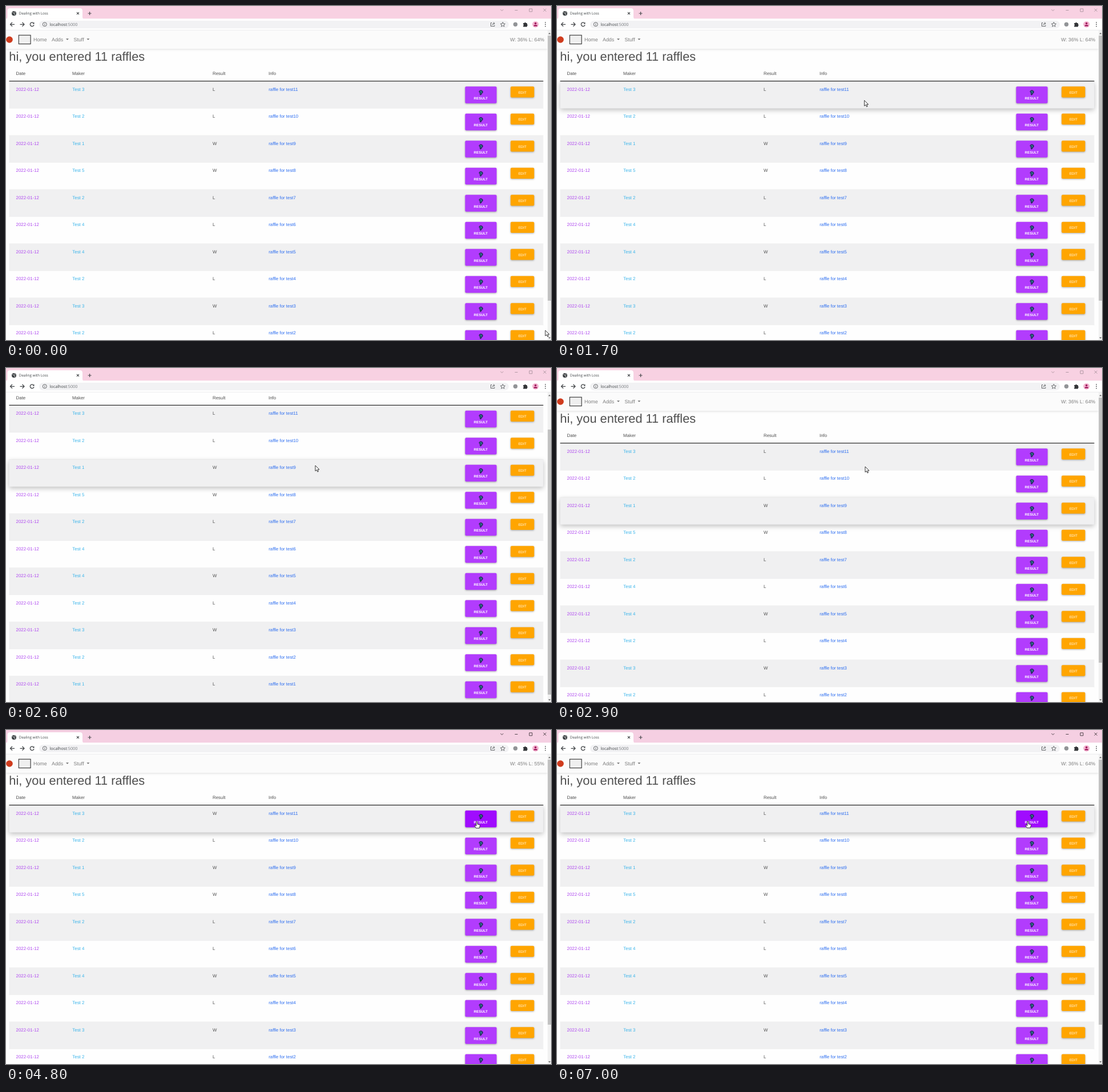
Recreate the animation shown at these times as an HTML page. Size 955 by 586 pixels, loop 7100 ms.

```html
<!DOCTYPE html>
<html lang="en">
<head>
<meta charset="utf-8">
<title>Raffles</title>
<style>
  html, body { margin: 0; width: 100%; height: 100%; overflow: hidden; background: #fff; }
  svg { display: block; width: 955px; height: 586px; }
  text { font-family: "Liberation Sans", Arial, sans-serif; font-size: 7.9px; fill: #4f4f4f;
         text-rendering: geometricPrecision; white-space: pre; }
  .ui { font-family: "Open Sans", sans-serif; fill: #3c4043; }
  .nav { font-size: 8.9px; fill: #7f7f7f; }
  .date { fill: #b04af0; }
  .maker { fill: #39b4ea; }
  .info { fill: #2a6cf0; }
  .btn { filter: drop-shadow(0 1px 1.4px rgba(0,0,0,.32)); }
  .label { fill: #fff; text-anchor: middle; font-size: 6.2px; font-weight: bold; }
  .line { fill: none; stroke: #45474a; stroke-width: 1.1; }
  #hover { filter: drop-shadow(0 3px 4px rgba(0,0,0,.24)); }
  #bar { filter: drop-shadow(0 1px 2px rgba(0,0,0,.13)); }
</style>
</head>
<body>
<svg viewBox="0 0 955 586">
  <defs>
    <clipPath id="view"><rect y="42" width="949" height="544"/></clipPath>
    <g id="ear">
      <path d="M-3 -1.2C-3 -5 3.4 -5 3.4 -1C3.4 1.3 1 1.4 .8 3C.6 4.6 -1.6 4.4 -1.5 2.6" fill="#26346b" stroke="#1c2440" stroke-width="1"/>
      <path d="M-1.4 -1C-1 -3 2 -2.6 1.6 -.6L-.4 1" fill="none" stroke="#35b5b0" stroke-width="1"/>
    </g>
  </defs>
  <rect width="955" height="586" fill="#fefefe"/>

  <g clip-path="url(#view)">
    <g id="page">
      <rect id="bar" y="30" width="949" height="45" fill="#fbfbfb"/>
      <circle cx="6" cy="59" r="5.8" fill="#cf3b1d"/>
      <rect x="22.3" y="51.2" width="20.8" height="15.4" fill="#efefef" stroke="#303030" stroke-width="1.1"/>
      <text class="nav" x="48" y="61.7">Home</text>
      <text class="nav" x="80" y="61.7">Adds</text>
      <text class="nav" x="118.5" y="61.7">Stuff</text>
      <path d="M105 57.2h5l-2.5 2.6zM141.400 57.2h5l-2.5 2.6z" fill="#6f6f6f"/>
      <text class="nav" id="rate" x="943.3" y="61.7" text-anchor="end" style="font-size:8.75px"></text>
      <text x="5.300" y="95.800" style="font-size:21.8px">hi, you entered 11 raffles</text>
      <text x="17.600" y="121.300">Date</text>
      <text x="116" y="121.300">Maker</text>
      <text x="362" y="121.300">Result</text>
      <text x="460" y="121.300">Info</text>
      <g id="stripes"></g>
      <rect id="hover" x="5.5" width="936" height="47.5"/>
      <rect x="5.5" y="131.200" width="936" height="1.200" fill="#222"/>
      <g id="cells"></g>
    </g>
  </g>

  <rect x="949" y="42" width="6" height="544" fill="#f1f1f1"/>
  <rect id="thumb" x="949.3" width="5.700" height="465" fill="#c1c1c1"/>
  <path d="M950.300 49.200h4l-2-2.400zM950.300 581.300h4l-2 2.400z" fill="#666"/>

  <g id="chrome">
    <rect id="top" width="955" height="22.500"/>
    <path d="M-1 22.500C2 22.500 2.500 21 2.500 18.500V8.500Q2.500 4 7 4H129.500Q134 4 134 8.500V18.500C134 21 134.500 22.500 138 22.500Z" fill="#fff"/>
    <rect y="22.300" width="955" height="19.900" fill="#fff"/>
    <path d="M0 42.300H955" stroke="#e3e3e5" stroke-width=".7"/>
    <circle cx="14" cy="13" r="4" fill="#3c4043"/>
    <path d="M11.200 11.200q2 1.800 3.200 1.200t.6 3.400M14.500 10l2 1.500" stroke="#fff" stroke-width=".8" fill="none"/>
    <text class="ui" x="22.800" y="15.300" style="font-size:6.3px">Dealing with Loss</text>
    <path class="line" d="M123.900 10.900l4 4m0-4l-4 4M143.600 13h6M146.600 10v6"/>
    <rect x="58" y="25.800" width="823" height="13.400" rx="6.700" fill="#f2f2f4"/>
    <path class="line" style="stroke-width:1.3" d="M15 32.300H7.500M11 28.800L7.500 32.300L11 35.800M24.500 32.300H32M28.500 28.800L32 32.300L28.500 35.800M48.700 30.600A3.400 3.400 0 1 0 49 33.200"/>
    <path d="M49.500 28.600v3h-3z" fill="#45474a"/>
    <g class="line" style="stroke-width:.8">
      <circle cx="67.800" cy="32.200" r="3.500"/>
      <path d="M67.800 31.800v2.300M67.800 30v.8"/>
      <path d="M851.500 29.500h-2v6h6.500v-2M851.800 33.500q.5-3 4-3M854 28.600l2.300 1.900l-2.300 2"/>
      <path d="M870.500 28.300l1.200 2.700l2.900.3l-2.200 1.900l.7 2.900l-2.600-1.500l-2.600 1.500l.7-2.900l-2.200-1.900l2.900-.3z"/>
    </g>
    <text class="ui" x="76.500" y="34.800" style="font-size:7.25px">localhost<tspan fill="#777a7e">:5000</tspan></text>
    <circle cx="892.600" cy="32.200" r="3.700" fill="#929497"/>
    <path d="M906.300 30h2.100a1.300 1.300 0 0 1 2.600 0h2.100v2.200a1.300 1.300 0 0 1 0 2.500v1.700h-6.800v-2a1.200 1.200 0 0 0 0-2.300z" fill="#333538"/>
    <circle cx="927.800" cy="32.200" r="5.500" fill="#f3b4d0"/>
    <path d="M924.600 35.400q0-2.400 3.200-2.400t3.200 2.400z" fill="#9c1458"/>
    <circle cx="927.800" cy="30.500" r="1.800" fill="#9c1458"/>
    <path d="M945.200 28.800v.01M945.200 32.200v.01M945.200 35.600v.01" stroke="#45474a" stroke-width="1.700" stroke-linecap="round"/>
    <path id="controls" fill="none" stroke-width=".9" d="M866.500 6l2.500 2.500l2.500-2.500M891.600 7.500h5M917 4.900h5v5h-5zM941.600 4.700l5 5m0-5l-5 5"/>
  </g>

  <g id="cursor">
    <path id="arrow" d="M0 0V9.800L2.300 7.700L3.900 11.200L5.500 10.500L4 7.100H7Z" fill="#fff" stroke="#222" stroke-width=".9"/>
    <path id="hand" d="M-1 .8Q0-.6 1 .8V4.700L4.800 5.600Q5.800 6 5.500 7.500L4.500 11.700H-1.300L-4 7.700Q-4.200 6.500-2.900 6.700L-1 8Z" fill="#fff" stroke="#222" stroke-width=".9"/>
  </g>
</svg>

<script>
const LOOP = 7100, STEP = 100;
const ROW_TOP = 132.2, ROW_H = 47.5, SCROLL = 66.5;
const makers = [3, 2, 1, 5, 2, 4, 4, 2, 3, 2, 1];
const results = "LLWWLLWLWLL";
const $ = id => document.getElementById(id);

const rowY = i => ROW_TOP + i * ROW_H;
const rowFill = i => i % 2 ? "#fefefe" : "#f0f0f1";

makers.forEach((maker, i) => {
  const y = rowY(i), base = y + 16.4;
  $("stripes").innerHTML += `<rect x="5.5" y="${y}" width="936" height="${ROW_H}" fill="${rowFill(i)}"/>
    <path d="M5.5 ${y + ROW_H}h936" stroke="#dfdfe0" stroke-width=".6"/>`;
  $("cells").innerHTML += `
    <text class="date" x="17.6" y="${base}">2022-01-12</text>
    <text class="maker" x="116.3" y="${base}">Test ${maker}</text>
    <text id="result${i}" x="362" y="${base}">${results[i]}</text>
    <text class="info" x="460.2" y="${base}" style="font-size:7.82px">raffle for test${11 - i}</text>
    <rect class="btn" id="button${i}" x="804.5" y="${y + 9}" width="55.2" height="29.6" rx="2" fill="#b23cfd"/>
    <use href="#ear" x="832" y="${y + 19.8}"/>
    <text class="label" x="832" y="${y + 31.4}">RESULT</text>
    <rect class="btn" x="884.2" y="${y + 9.1}" width="41.3" height="19.3" rx="2" fill="#ffa500"/>
    <text class="label" x="905" y="${y + 21.5}" style="font-weight:normal">EDIT</text>`;
});

// Keys: time, then values; linear in between.
const path = [
  [0, 945, 569], [200, 880, 500], [500, 705, 370], [800, 560, 262], [1000, 525, 202],
  [1400, 535, 165], [1900, 541, 166], [2400, 543, 168], [2800, 541, 174], [2900, 540, 173],
  [3300, 610, 168], [3700, 735, 160], [3900, 795, 158], [4000, 814, 159], [4300, 825, 160.5], [LOOP, 825, 160]
];
const scrollKeys = [[0, 0], [1900, 0], [2000, SCROLL], [2800, SCROLL], [2900, 0], [LOOP, 0]];
const glow = [[0, 0], [4000, 0], [4200, 1], [LOOP, 1]];

function sample(keys, t) {
  const n = Math.max(1, keys.findIndex(k => k[0] > t));
  const a = keys[n - 1], b = keys[n];
  const p = (t - a[0]) / (b[0] - a[0]);
  return a.slice(1).map((v, i) => v + (b[i + 1] - v) * p);
}

function hoveredRow(t) {
  const [x, y] = sample(path, Math.max(0, t));
  const row = Math.floor((y + sample(scrollKeys, Math.max(0, t))[0] - ROW_TOP) / ROW_H);
  return x < 941 && row >= 0 && row < makers.length ? row : -1;
}

function draw(t) {
  const [x, y] = sample(path, t);
  const [scroll] = sample(scrollKeys, t);
  const [lit] = sample(glow, t);
  const won = t >= 4600 && t < 6400;
  const focused = t >= 4500;

  $("page").setAttribute("transform", `translate(0 ${-scroll})`);
  $("thumb").setAttribute("y", 52 + scroll / SCROLL * 56);

  // Hover follows the pointer a moment late.
  const row = hoveredRow(t - 110);
  $("hover").setAttribute("visibility", row < 0 ? "hidden" : "visible");
  if (row >= 0) {
    $("hover").setAttribute("y", rowY(row));
    $("hover").setAttribute("fill", rowFill(row));
  }

  $("button0").setAttribute("fill", `rgb(${178 - 18 * lit} ${60 - 48 * lit} 254)`);
  $("result0").textContent = won ? "W" : "L";
  $("rate").textContent = won ? "W: 45% L: 55%" : "W: 36% L: 64%";
  $("top").setAttribute("fill", focused ? "#f5cfe2" : "#f8d1e2");
  $("controls").setAttribute("stroke", focused ? "#40363c" : "#aa929e");

  const pointing = x > 804 && y < 171;
  $("cursor").setAttribute("transform", `translate(${x} ${y})`);
  $("arrow").setAttribute("visibility", pointing ? "hidden" : "visible");
  $("hand").setAttribute("visibility", pointing ? "visible" : "hidden");
}

const start = performance.now();
function tick() {
  const t = (performance.now() - start) % LOOP;
  draw(Math.floor(t / STEP) * STEP);
  requestAnimationFrame(tick);
}
tick();
</script>
</body>
</html>
```
